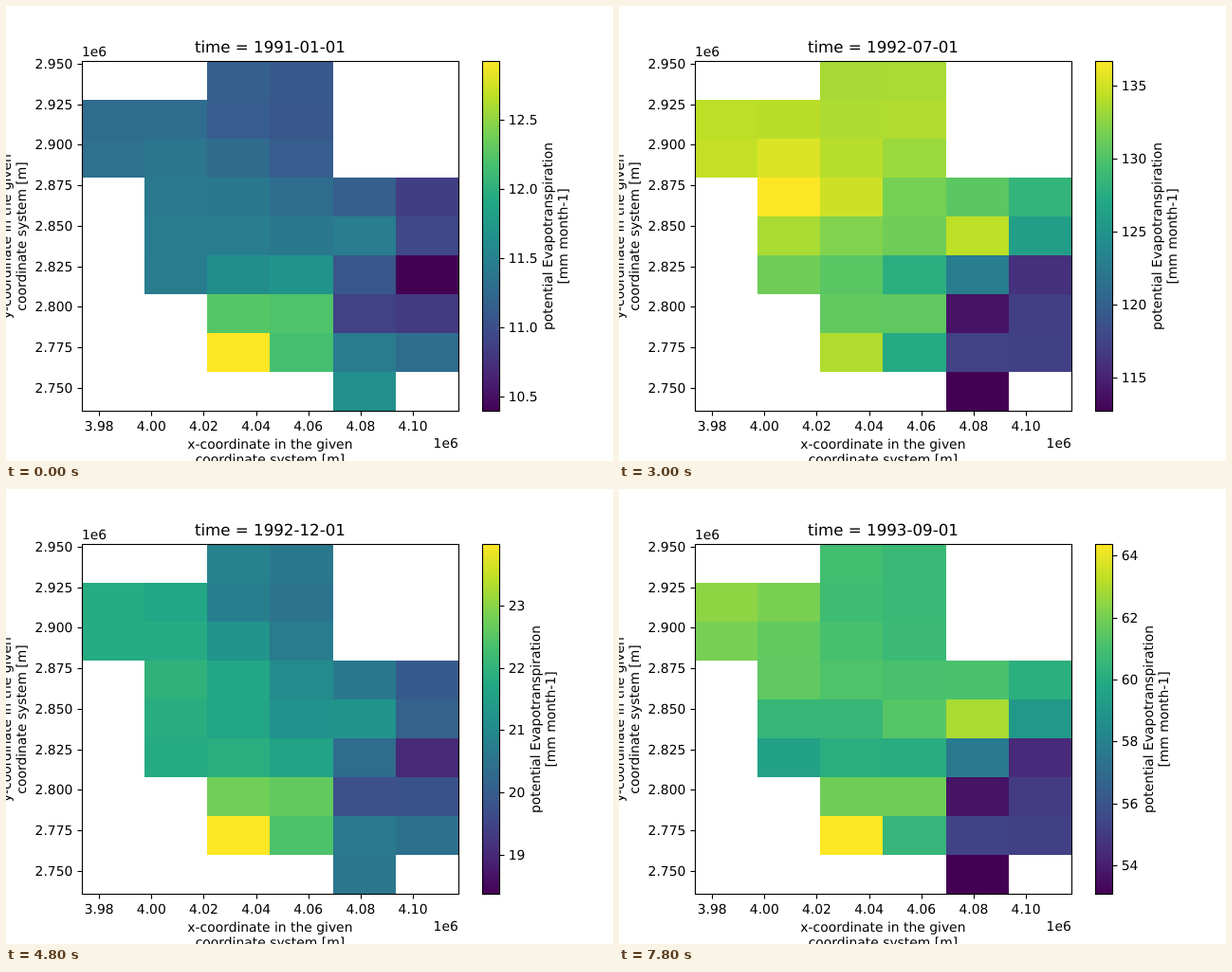
An HTML page for the animation above (8000 ms loop, 640x480 px).

```html
<!DOCTYPE html>
<html lang="en">
<head>
<meta charset="utf-8">
<title>Evapotranspiration map</title>
<style>
  html, body { margin: 0; width: 100%; height: 100%; overflow: hidden; background: #fff; }
  svg { display: block; width: 640px; height: 480px; }
  text {
    font: 13.89px "DejaVu Sans", sans-serif;
    text-rendering: geometricPrecision;
    text-anchor: middle;
    white-space: pre;
  }
  #title { font-size: 16.67px; }
  .start { text-anchor: start; }
  .end { text-anchor: end; }
  .line { fill: none; stroke: #000; stroke-width: 1.11; }
  #cells { shape-rendering: crispEdges; }
</style>
</head>
<body>
<svg id="stage" viewBox="0 0 640 480">
  <defs><linearGradient id="ramp" x1="0" y1="1" x2="0" y2="0"></linearGradient></defs>
  <g id="cells"></g>
  <rect x="502" y="58" width="19" height="370" fill="url(#ramp)"/>
  <g id="axes"></g>
  <rect class="line" x="80.5" y="58.5" width="397" height="369"/>
  <rect class="line" x="502.5" y="58.5" width="18" height="369"/>
  <text id="title" x="278.4" y="49"></text>
  <text class="start" x="80" y="53">1e6</text>
  <text class="end" x="476.8" y="466">1e6</text>
  <text x="278.4" y="467">x-coordinate in the given</text>
  <text x="278.4" y="483">coordinate system [m]</text>
  <g transform="translate(0 243) rotate(-90)">
    <text y="5">y-coordinate in the given</text>
    <text y="21">coordinate system [m]</text>
  </g>
  <g id="bar"></g>
  <g id="barLabel">
    <text>potential Evapotranspiration</text>
    <text y="16">[mm month-1]</text>
  </g>
</svg>
<script>
const LOOP = 8000, STEP = 300;
const LEFT = 80, TOP = 57.6, WIDTH = 396.8, HEIGHT = 369.6, BOTTOM = TOP + HEIGHT;
const COLORS = ['440154', '482475', '414487', '355f8d', '2a788e', '21918c',
                '22a884', '44bf70', '7ad151', 'bddf26', 'fde725'];
const RGB = COLORS.map(c => [0, 2, 4].map(i => parseInt(c.slice(i, i + 2), 16)));
// first and last filled column of each grid row
const SPANS = ['23', '03', '03', '15', '15', '15', '25', '25', '44'];
// column and row of the places where the level is known
const POINTS = ['01', '31', '13', '15', '44', '53', '55', '36', '46', '27', '48'];

const $ = id => document.getElementById(id);
const lerp = (a, b, k) => a + (b - a) * k;
const logLerp = (a, b, k) => a * Math.pow(b / a, k);

function add(parent, tag, attrs, text) {
  const el = document.createElementNS('http://www.w3.org/2000/svg', tag);
  for (const name in attrs) el.setAttribute(name, attrs[name]);
  if (text) el.textContent = text;
  parent.appendChild(el);
  return el;
}

// Levels at POINTS, as a percentage of the colour range
const keys = [];
function key(step, year, month, min, max, ...levels) {
  keys.push({ step, month: year * 12 + month - 1, min, max, levels });
}
key(0, 1991, 1, 10.399, 12.93, 35, 27, 41, 41, 42, 18, 0, 72, 19, 100, 49);
key(4, 1992, 1, 10.553, 12.713, 100, 56, 83, 56, 40, 15, 0, 47, 27, 45, 62);
key(10, 1992, 7, 112.71, 136.74, 90, 88, 100, 78, 90, 65, 14, 75, 5, 88, 0);
key(14, 1992, 10, 26.468, 32.307, 89, 69, 95, 70, 79, 56, 8, 78, 7, 100, 7);
key(18, 1993, 2, 12.743, 17.823, 34, 8, 33, 52, 24, 0, 15, 73, 42, 100, 72);
key(22, 1993, 6, 104.216, 128.98, 98, 94, 100, 65, 85, 70, 18, 68, 5, 81, 0);
key(26, 1993, 9, 53.075, 64.395, 83, 67, 75, 57, 87, 63, 12, 78, 5, 100, 0);

// Share of each known point in a cell: inverse cube of the distance
function sharesAt(col, row) {
  const raw = POINTS.map(([c, r]) => 1 / (Math.hypot(col - c, row - r) ** 3 + 1e-6));
  const sum = raw.reduce((a, b) => a + b);
  return raw.map(w => w / sum);
}

function color(level) {
  const p = level / 10, i = Math.min(Math.floor(p), 9);
  return `rgb(${RGB[i].map((c, n) => Math.round(lerp(c, RGB[i + 1][n], p - i)))})`;
}

function xTick(x, label) {
  add($('axes'), 'path', { class: 'line', d: `M${Math.round(x) + .5} 427.5v5` });
  add($('axes'), 'text', { x, y: 448 }, label);
}

function yTick(y, label) {
  add($('axes'), 'path', { class: 'line', d: `M80.5 ${Math.round(y) + .5}h-5` });
  add($('axes'), 'text', { class: 'end', x: 70.3, y: Math.round(y + 5) }, label);
}

COLORS.forEach((c, i) => add($('ramp'), 'stop', { offset: i / 10, 'stop-color': '#' + c }));
for (let i = 0; i < 7; i++) xTick(98.15 + i * 55.15, (3.98 + i * .02).toFixed(2));
for (let i = 0; i < 9; i++) yTick(61 + i * 42.72, (2.95 - i * .025).toFixed(3));

const cells = [];
SPANS.forEach(([from, to], row) => {
  const edgeX = col => Math.round(LEFT + col * WIDTH / 6);
  const edgeY = r => Math.round(TOP + r * HEIGHT / 9);
  for (let col = +from; col <= +to; col++) {
    const x = edgeX(col), y = edgeY(row);
    const el = add($('cells'), 'rect',
      { x, y, width: edgeX(col + 1) - x, height: edgeY(row + 1) - y });
    cells.push({ el, shares: sharesAt(col, row) });
  }
});

// Smallest round interval that gives at most nine parts
function tickStep(range) {
  const raw = range / 9, unit = Math.pow(10, Math.floor(Math.log10(raw)));
  return unit * [1, 2, 2.5, 5, 10].find(n => n * unit >= raw);
}

function drawBar(min, max) {
  const bar = $('bar'), step = tickStep(max - min);
  let digits = 0, widest = 0;
  while (digits < 3 && Math.abs(step - +step.toFixed(digits)) > 1e-6) digits++;
  bar.replaceChildren();
  for (let n = Math.ceil(min / step); n * step <= max; n++) {
    const label = (n * step).toFixed(digits);
    const y = BOTTOM - (n * step - min) / (max - min) * HEIGHT;
    add(bar, 'path', { class: 'line', d: `M520.5 ${Math.round(y) + .5}h5` });
    add(bar, 'text', { class: 'start', x: 529.8, y: Math.round(y + 5) }, label);
    widest = Math.max(widest, label.length * 8.84 - (digits ? 4.42 : 0));
  }
  const x = Math.round(545.2 + widest);
  $('barLabel').setAttribute('transform', `translate(${x} 243) rotate(-90)`);
}

function draw(step) {
  const i = Math.max(1, keys.findIndex(k => k.step >= step));
  const a = keys[i - 1], b = keys[i];
  const k = (step - a.step) / (b.step - a.step);
  const month = Math.round(lerp(a.month, b.month, k));
  const mm = String(month % 12 + 1).padStart(2, '0');
  $('title').textContent = `time = ${Math.floor(month / 12)}-${mm}-01`;
  const levels = a.levels.map((v, n) => lerp(v, b.levels[n], k));
  for (const { el, shares } of cells) {
    el.setAttribute('fill', color(shares.reduce((sum, w, n) => sum + w * levels[n], 0)));
  }
  drawBar(logLerp(a.min, b.min, k), logLerp(a.max, b.max, k));
}

let shown = -1;
const start = performance.now();
function tick() {
  const step = Math.floor((performance.now() - start) % LOOP / STEP);
  if (step !== shown) draw(shown = step);
  requestAnimationFrame(tick);
}
tick();
</script>
</body>
</html>
```
